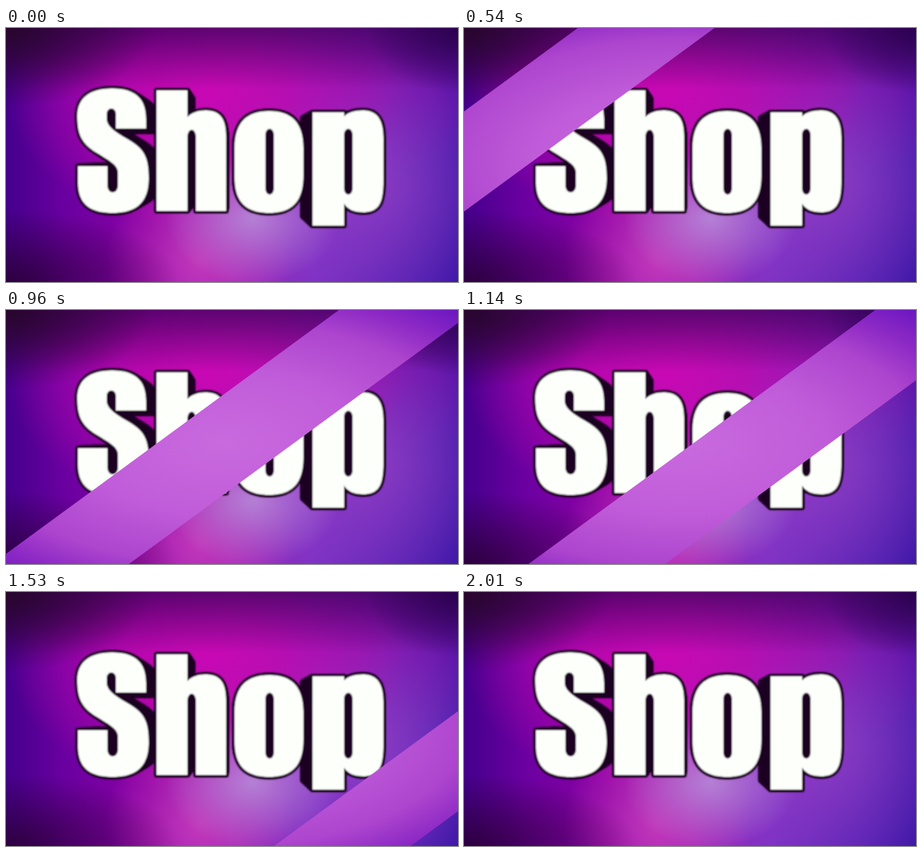
Animation of 678x382 px, one loop 2.04 s. Source, as an HTML page:

```html
<!DOCTYPE html>
<html lang="en">
<head>
<meta charset="utf-8">
<title>Shop</title>
<style>
  html, body { margin: 0; width: 100%; height: 100%; overflow: hidden; }
  body {
    background:
      radial-gradient(ellipse 220px 120px at 0 0, #28062c, #28062c00),
      radial-gradient(ellipse 260px 110px at 0 382px, #28002ed0, #28002e00),
      radial-gradient(ellipse 140px 100px at 678px 0, #240046c0, #24004600),
      linear-gradient(#40005cc0, #40005c00 24%),
      radial-gradient(ellipse 130px 100px at 370px 286px, #b688d8e8, #b688d800),
      radial-gradient(ellipse 140px 150px at 290px 350px, #c83cbce0, #c83cbc00),
      radial-gradient(ellipse 300px 210px at 300px 95px, #c808b4, #c408b0c0 40%, #c008b000),
      radial-gradient(ellipse 210px 200px at 540px 230px, #9c44c8c0, #9c44c800),
      radial-gradient(ellipse 260px 150px at 530px 70px, #880ca8e0, #880ca800),
      linear-gradient(90deg, #44008c, #6a00a0 13%, #8c02a4 32%, #9a28b8 50%, #7c30c4 68%, #4018a8);
  }
  svg { position: fixed; left: 0; top: 0; display: block; }
</style>
</head>
<body>
<svg width="678" height="382" viewBox="0 0 678 382" role="img" aria-label="Shop">
  <defs>
    <radialGradient id="shine" gradientUnits="userSpaceOnUse" cx="0" cy="0" r="1"
      gradientTransform="translate(325 200) scale(540 270)">
      <stop offset="0" stop-color="#c96ade"/>
      <stop offset=".4" stop-color="#c05cd9"/>
      <stop offset=".68" stop-color="#ad45ce"/>
      <stop offset=".83" stop-color="#8e2ac5"/>
      <stop offset="1" stop-color="#6815c0"/>
    </radialGradient>
    <filter id="soft"><feGaussianBlur stdDeviation=".8"/></filter>
    <g id="word" fill-rule="evenodd">
      <path d="M210 151V137C210 106 194 91 159 91C125 91 107 106 107 132C107 160 113 173 135 187C156 200 168 206 168 218V236C168 251 152 251 152 236V208H108V232C108 264 125 278 160 278C196 278 214 262 214 226C214 196 208 183 187 170C165 157 151 149 151 136V130C151 118 165 118 165 130V151Z"/>
      <path d="M226 94H272V134C279 127 288 124 300 124C322 124 330 138 330 162V275H285V165C285 149 272 149 272 165V275H226Z"/>
      <path d="M343 180C343 142 361 125 395 125C428 125 446 142 446 180V222C446 260 430 278 395 278C360 278 343 262 343 225ZM389 162V240C389 254 402 254 402 240V162C402 148 389 148 389 162Z"/>
      <path d="M460 127H507V133C513 127 523 124 536 124C558 124 566 140 566 165V230C566 262 560 277 536 277C522 277 513 273 507 264V297H460ZM507 162V240C507 254 520 254 520 240V162C520 148 507 148 507 162Z"/>
    </g>
  </defs>
  <g filter="url(#soft)">
    <g id="depth" fill="#1c0422" stroke="#1c0422" stroke-width="8" stroke-linejoin="round"></g>
    <use href="#word" fill="#fcfffa"/>
  </g>
  <polygon id="band" fill="url(#shine)"/>
</svg>
<script>
  const depth = document.getElementById("depth");
  const band = document.getElementById("band");
  const LOOP = 2040, TICK = 30, STEP = 23.48, WIDTH = 205, LEAN = 520;
  const HOLDS = [12, 35, 57]; // ticks on which the band pauses

  // Extrude the word towards a vanishing point, back to front.
  for (let i = 0; i <= 24; i++) {
    const copy = document.createElementNS("http://www.w3.org/2000/svg", "use");
    copy.setAttribute("href", "#word");
    copy.setAttribute("transform",
      `translate(340 190) scale(${0.87 + 0.13 * i / 24}) translate(-340 -190)`);
    depth.append(copy);
  }

  const start = performance.now();
  function draw(now) {
    const tick = Math.floor(Math.max(0, now - start) % LOOP / TICK);
    const moved = tick - HOLDS.filter(h => tick >= h).length;
    const x = STEP * (moved - 1);
    band.setAttribute("points",
      `${x},0 ${x - WIDTH},0 ${x - WIDTH - LEAN},382 ${x - LEAN},382`);
    requestAnimationFrame(draw);
  }
  draw(start);
</script>
</body>
</html>
```
